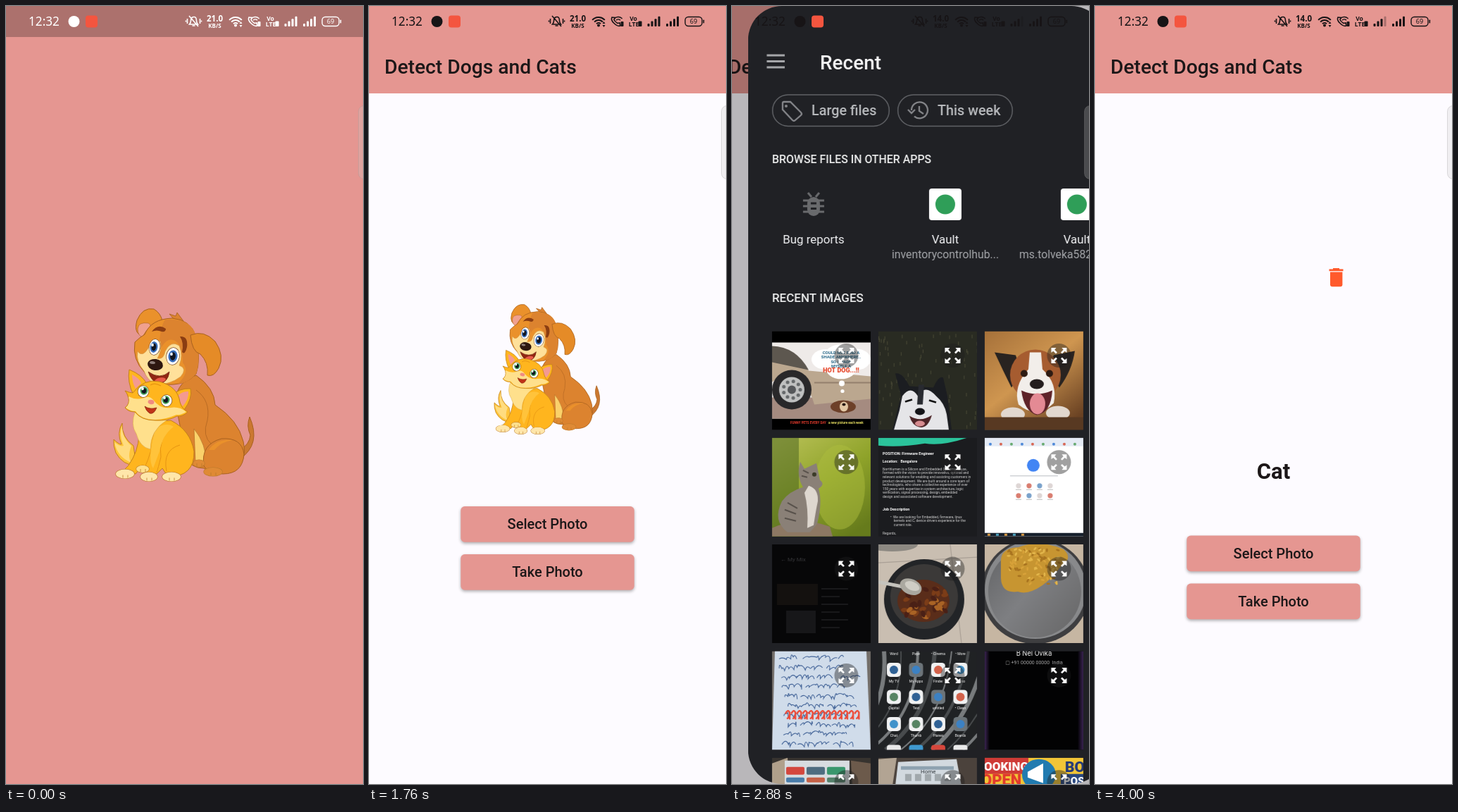
Recreate the animation shown at these times as an HTML page with a canvas. Size 507 px wide and 1104 px high, loop 4.08 s.

```html
<!DOCTYPE html>
<html lang="en">
<head>
<meta charset="utf-8">
<title>Pet detector</title>
<style>
html, body { margin: 0; width: 100%; height: 100%; overflow: hidden; background: #e59691; }
canvas { display: block; }
</style>
</head>
<body>
<canvas id="stage" width="507" height="1104"></canvas>
<script>
const W = 507, H = 1104, LOOP = 4080, STEP = 80;
const PINK = '#e59691', PAPER = '#fdfbff', INK = '#1c1718', DARK = '#202125';
const ROBOTO = 'Roboto, sans-serif', NOTO = '"Noto Sans", sans-serif';
const stage = document.getElementById('stage').getContext('2d');
let g = stage;

const clamp = v => Math.max(0, Math.min(1, v));

function randomizer(seed) {
  return () => (seed = (seed * 16807) % 2147483647) / 2147483647;
}
function layer(draw) {
  const canvas = document.createElement('canvas');
  canvas.width = W;
  canvas.height = H;
  const previous = g;
  g = canvas.getContext('2d');
  draw();
  g = previous;
  return canvas;
}
function rect(x, y, w, h, fill, r = 0) {
  g.beginPath();
  g.roundRect(x, y, w, h, r);
  g.fillStyle = fill;
  g.fill();
}
function oval(x, y, rx, ry, fill, turn = 0) {
  g.beginPath();
  g.ellipse(x, y, rx, ry, turn, 0, 7);
  g.fillStyle = fill;
  g.fill();
}
function shape(d, fill, line, width = 1) {
  const path = new Path2D(d);
  if (fill) { g.fillStyle = fill; g.fill(path); }
  if (line) { g.strokeStyle = line; g.lineWidth = width; g.stroke(path); }
}
function text(s, x, y, size, fill, { weight = 400, align = 'left', font = ROBOTO } = {}) {
  g.font = `${weight} ${size}px ${font}`;
  g.textAlign = align;
  g.fillStyle = fill;
  g.fillText(s, x, y);
}
function gradient(x0, y0, x1, y1, ...colors) {
  const fill = g.createLinearGradient(x0, y0, x1, y1);
  colors.forEach((c, i) => fill.addColorStop(i / (colors.length - 1), c));
  return fill;
}

/* Dog and cat */

function eye(x, y, rx, ry, iris, dx, dy) {
  oval(x, y, rx + .7, ry + .7, '#7b4a20', .15);
  oval(x, y, rx, ry, '#fff', .15);
  oval(x + dx, y + dy, rx * .72, ry * .72, iris, .15);
  oval(x + dx, y + dy, rx * .43, ry * .48, '#10141f', .15);
  oval(x + dx - 2, y + dy - 3, 1.8, 2.2, '#fff');
}
function paw(x, y, rx, ry, fill) {
  oval(x, y, rx + .6, ry + .6, '#b9792b');
  oval(x, y, rx, ry, fill);
  shape(`M${x - 3} ${y + ry - 5}v4M${x + 4} ${y + ry - 5}v4`, null, '#b9792b', .8);
}
function dog() {
  const tan = '#dc832f', edge = '#a8611f', bright = '#ea912b', cream = '#ffe09a';
  shape('M332 643Q363 622 346 583Q341 596 347 609Q346 622 332 630Z', '#cb7830', edge);
  shape('M240 560Q244 532 270 524Q296 542 297 566Q330 588 337 618Q343 646 324 660Q300 668 281 656Q262 656 256 640Z', tan, edge);
  shape('M270 545Q291 560 286 588Q278 610 292 622', null, '#b96b24', 1);
  shape('M267 600Q285 622 284 650Q276 657 269 648Z', '#fad16a', edge, .6);
  shape('M281 653Q276 622 306 614Q335 612 338 636Q336 664 308 664Q289 664 281 653Z', tan, edge);
  shape('M288 630Q298 614 322 616Q306 618 296 630Z', bright);
  paw(294, 661, 13, 6, '#df8a35');
  paw(274, 649, 8, 5, '#df8a35');
  shape('M198 468Q180 468 186 446Q194 427 210 430Q220 436 222 447Q207 452 198 468Z', bright, edge);
  shape('M187 458Q188 448 202 450Q209 453 200 460Q196 465 194 470Q187 468 187 458Z', '#f0a08e', edge, .6);
  shape('M238 444L232 437L241 440L243 435L252 447Z', tan, edge, .8);
  shape('M197 466Q206 444 236 443Q262 445 270 469Q277 502 270 522Q258 536 238 537Q206 539 197 520Q179 502 183 477Q190 470 197 466Z', bright, edge);
  shape('M226 445Q264 442 270 469Q277 502 270 522Q258 536 244 536Q262 520 251 506Q250 478 238 474Q226 470 217 492Q218 456 226 445Z', tan);
  shape('M203 484Q208 470 219 476Q222 488 215 500Q224 502 226 490Q234 474 246 482Q252 496 246 510Q258 514 248 526Q232 538 212 537Q200 530 196 518Q184 504 187 490Q194 500 203 484Z', cream, '#cf9440', .6);
  shape('M262 467Q281 459 297 476Q311 496 302 514Q295 527 286 524Q288 506 276 494Q264 491 262 467Z', '#e58b27', edge);
  eye(211, 484, 7.5, 11, '#376dbb', -1, 0);
  eye(237, 497, 9, 12, '#376dbb', 0, 0);
  shape('M207 462Q216 450 227 458Q227 463 221 462Q214 459 207 462Z', '#8a3d12');
  shape('M247 469Q259 468 257 484Q254 496 250 491Q253 478 247 469Z', '#8a3d12');
  oval(212, 509, 11, 8, '#2e1710', .15);
  oval(208, 506, 4, 2, '#8d7c78', .15);
  shape('M202 519Q219 531 232 519Q230 535 216 536Q206 532 202 519Z', '#912612', '#6c220e', .8);
  oval(219, 531, 8, 3.5, '#e95b4a', -.2);
}
function cat() {
  const gold = '#ffb51e', edge = '#c28019', cream = '#ffe08c';
  shape('M165 592Q164 612 181 624L185 652Q166 652 156 634Q152 624 153 615Q160 622 164 622Q157 606 165 592Z', '#ffc43b', edge);
  shape('M165 595Q164 612 178 624Q172 640 178 648Q158 640 154 619Q162 626 167 624Q160 608 165 595Z', '#ffdc80');
  shape('M190 592Q190 624 180 642Q174 654 166 660L184 664L194 652L196 664L214 664L222 656L230 668Q268 668 267 632Q262 602 234 588Z', gold, edge);
  shape('M210 606Q208 632 196 657M234 598Q216 616 220 640Q216 656 214 662M247 623Q222 630 228 660', null, '#e69412', 1);
  shape('M212 600Q228 590 238 597Q222 609 218 632Q212 648 209 656Q200 644 212 600Z', '#ffc33b');
  paw(194, 657, 9, 5, cream);
  paw(169, 664, 13, 6.5, '#ffe6aa');
  paw(203, 668, 12, 6.5, '#ffe6aa');
  paw(235, 668, 13, 6.5, '#ffe6aa');
  shape('M184 574Q176 594 185 607Q190 626 205 629Q205 602 228 588L232 584Z', cream, '#d9a545', .6);
  shape('M175 516Q193 523 200 536L181 552Q172 534 175 516Z', gold, edge);
  shape('M179 523Q189 528 192 535L184 543Q179 534 179 523Z', '#f49a91');
  shape('M235 553Q246 542 262 543Q265 557 253 573L240 575Z', gold, edge);
  shape('M242 555Q250 546 259 547Q260 558 251 568Z', '#f49a91');
  shape('M180 549Q196 528 218 533Q244 540 247 562Q249 571 258 576Q251 583 243 582Q230 589 212 588Q192 588 183 576Q174 576 169 570Q176 565 174 556Q172 549 169 546Q176 549 180 549Z', gold, edge);
  shape('M174 554Q185 560 196 556Q204 552 210 560Q219 572 234 570Q246 568 256 576Q248 581 242 580Q226 587 212 587Q192 587 184 575Q176 575 170 570Q177 564 174 554Z', cream);
  eye(195, 547, 7.5, 8, '#42a15b', 1, -1);
  eye(228, 560, 7.5, 8, '#42a15b', -1, -1);
  oval(206, 562, 4.5, 3.2, '#f08b82', .2);
  shape('M197 568Q204 573 214 570Q210 580 204 578Q199 575 197 568Z', '#bf3318', '#82260f', .7);
  shape('M205 538Q211 534 220 539', null, '#e69412', 1.2);
}
function pets(x, y, scale) {
  g.save();
  g.translate(x, y);
  g.scale(scale, scale);
  g.translate(-153, -429);
  g.lineJoin = 'round';
  dog();
  cat();
  g.restore();
}

/* App pages */

function button(label, y) {
  g.save();
  g.shadowColor = 'rgba(0,0,0,.32)';
  g.shadowBlur = 4;
  g.shadowOffsetY = 2;
  rect(130.3, y, 246.4, 50.7, PINK, 5.6);
  g.restore();
  text(label, 253.5, y + 32, 20, INK, { weight: 500, align: 'center' });
}
function page(result) {
  rect(0, 0, W, H, PAPER);
  rect(0, 0, W, 124, PINK);
  text('Detect Dogs and Cats', 22, 95.5, 28.2, INK, { weight: 500 });
  const shift = result ? 41.5 : 0;
  if (result) {
    const red = '#ff5a2c';
    rect(338, 372, 9, 3, red);
    rect(332.5, 373.4, 20, 2.8, red);
    rect(334, 377.6, 17.4, 20.6, red, [0, 0, 3, 3]);
    text('Cat', 253.5, 671, 31, INK, { weight: 700, align: 'center' });
  } else {
    pets(178, 423, .752);
  }
  button('Select Photo', 710 + shift);
  button('Take Photo', 778 + shift);
}

/* Thumbnails, each in a 140 px square */

function lines(rows, x, y, gap, size, fill, options) {
  rows.forEach((row, i) => text(row, x, y + i * gap, size, fill, options));
}
function scribble(x, y, width, height, color, weight, random) {
  g.beginPath();
  g.moveTo(x, y);
  for (let dx = 0; dx < width; dx += height * .8) {
    if (random() < .2) g.moveTo(x + dx, y);
    else g.quadraticCurveTo(x + dx, y - height * (random() + .4), x + dx + height * (random() - .2), y + height * (random() - .5));
  }
  g.strokeStyle = color;
  g.lineWidth = weight;
  g.stroke();
}

const photos = [
  function car() {
    rect(0, 0, 140, 140, '#000');
    rect(0, 16, 140, 108, '#eeeae8');
    rect(0, 94, 140, 30, '#a58b80');
    shape('M0 38Q36 36 52 56L140 64V96L60 104Q48 60 10 66L0 72Z', '#bba78f');
    shape('M0 21Q34 22 52 55L0 44Z', '#5d574f');
    rect(60, 72, 80, 2, '#94806d');
    oval(28, 83, 28, 28, '#29282a');
    oval(28, 83, 18, 18, '#bfc0c0');
    oval(28, 83, 6, 6, '#55575a');
    for (let i = 0; i < 9; i++) oval(28 + 12 * Math.cos(i * .7), 83 + 12 * Math.sin(i * .7), 2.5, 2.5, '#66696b');
    [[76, 40, 20], [98, 36, 24], [119, 40, 21], [98, 52, 22]].forEach(([x, y, r]) => oval(x, y, r, r * .72, '#fff'));
    lines(['COULD NOT FIND A', 'SHADE ANYWHERE..', 'SO I MADE', 'MYSELF A'], 98, 32, 6.5, 6, '#236587', { weight: 700, align: 'center' });
    text('HOT DOG...!!', 98, 58, 9, '#e64124', { weight: 900, align: 'center' });
    oval(99, 74, 4, 4, '#fff');
    oval(100, 85, 2.6, 2.6, '#fff');
    oval(101, 107, 18, 9, '#6d4029');
    oval(102, 107, 6, 7, '#e3c8a5');
    oval(102, 104, 2.5, 2, '#24140e');
    text('FUNNY PETS EVERY DAY', 26, 131, 4.5, '#e63c2d', { weight: 700 });
    text('a new picture each week', 80, 131, 4.5, '#eee564', { weight: 700 });
  },
  function husky() {
    rect(0, 0, 140, 140, '#292b22');
    const random = randomizer(8);
    for (let i = 0; i < 90; i++) rect(random() * 140, random() * 140, 1.2, 5, '#464634');
    shape('M24 60L32 92L20 140H104L98 92L92 66Q86 62 78 80L44 78Q34 58 24 60Z', '#1b1d21');
    shape('M34 92Q46 76 56 92Q66 74 82 92Q94 102 97 118L100 140H22L30 112Z', '#e5e5e8');
    shape('M57 76L65 76L63 104L55 104Z', '#282a30');
    shape('M38 100l10-3M72 98l10 3', null, '#111', 2.4);
    oval(59, 114, 7, 5, '#141418');
    shape('M44 120Q60 130 76 119Q70 139 58 136Q48 134 44 120Z', '#4c2427');
    oval(59, 131, 7, 4, '#d78c90');
  },
  function collie() {
    rect(0, 0, 140, 140, gradient(0, 0, 110, 140, '#a6713a', '#cf9650', '#6a4223'));
    shape('M14 30L44 34L52 58L38 80Q26 56 14 30ZM128 28L98 34L90 54L106 80Q124 56 128 28Z', '#292320');
    oval(72, 62, 36, 36, '#a65c30');
    shape('M64 30H80L82 54Q104 74 98 102Q74 126 48 104Q40 78 62 54Z', '#f2eeea');
    oval(56, 60, 5, 5, '#2e1b13');
    oval(92, 60, 5, 5, '#2e1b13');
    oval(74, 75, 10, 7, '#241d1d');
    shape('M52 84Q74 94 96 84Q94 116 74 119Q56 114 52 84Z', '#5e2329');
    oval(75, 103, 11, 15, '#e48a94');
    oval(40, 118, 17, 10, '#e2d8cf');
    oval(104, 116, 17, 10, '#e2d8cf');
    rect(0, 122, 140, 18, '#583922');
  },
  function kitten() {
    rect(0, 0, 140, 140, gradient(20, 0, 110, 140, '#b6bf54', '#8fa32a', '#667b1c'));
    rect(0, 0, 38, 140, 'rgba(70,96,30,.5)');
    oval(96, 70, 36, 60, 'rgba(173,190,62,.5)');
    shape('M0 128Q40 110 82 126L86 140H0Z', '#8d7863');
    shape('M40 34L46 44L63 36L68 60Q76 66 66 72Q72 92 64 122L54 134H22Q0 118 14 90Q24 76 44 70Q34 54 40 34Z', '#8a8077');
    shape('M52 68Q66 72 65 90Q62 104 59 124L50 128Q52 100 46 78Z', '#ded7cf');
    oval(60, 52, 3, 3, '#3b3b28');
    shape('M22 92l14 8M18 102l16 6M18 114l16 4M44 46l8 4M42 54l8 2', null, '#58514b', 2);
  },
  function vacancy() {
    rect(0, 0, 140, 140, '#1b1c1f');
    shape('M0 0H126Q90 12 66 8Q30 14 0 11Z', '#2bc39b');
    const bold = { weight: 700 };
    text('POSITION: Firmware Engineer', 6, 24, 5.4, '#fff', bold);
    text('Location:   Bangalore', 6, 35, 5.2, '#fff', bold);
    lines(['Northlumen is a Silicon and Embedded Systems house,', 'formed with the vision to provide innovative, optimal and', 'relevant solutions for enabling and assisting customers in', 'product development. We are built around a core team of', 'technologists, who share a collective experience of over',
      '150 years with expertise in system architecture, logic', 'verification, signal processing, design, embedded', 'design and associated software development.'], 6, 46, 5.6, 4.9, '#d7d7d7');
    text('Job Description', 6, 103, 5.4, '#fff', bold);
    lines(['•  We are looking for Embedded, firmware, linux', '    kernels and C, device drivers experience for the', '    current role.'], 17, 114, 5.6, 4.9, '#d7d7d7');
    text('Regards,', 6, 137, 4.9, '#d7d7d7');
  },
  function browser() {
    rect(0, 0, 140, 140, '#fff');
    rect(0, 0, 140, 12, '#e5ebf5');
    for (let i = 0; i < 9; i++) oval(8 + i * 15, 9, 2, 2, ['#4d88d8', '#d86654', '#66aa70'][i % 3]);
    oval(69, 39, 9, 9, '#4285f4');
    shape('M36 54H104', null, '#b9bdc2', 1);
    for (let i = 0; i < 8; i++) {
      const x = 48 + i % 4 * 15, y = 68 + (i >> 2) * 14;
      oval(x, y, 3.6, 3.6, ['#ded6d5', '#d97d70', '#7aa2cb'][i % 3]);
      rect(x - 4, y + 5, 8, 1, '#bbb');
    }
    rect(0, 135, 140, 5, '#17202c');
    for (let i = 0; i < 5; i++) rect(4 + i * 12, 136, 4, 3, ['#da9b45', '#4da5c1'][i % 2]);
  },
  function playlist() {
    rect(0, 0, 140, 140, '#070708');
    text('← My Mix', 12, 24, 8, '#38383b');
    rect(7, 56, 58, 30, '#14110f');
    rect(20, 94, 42, 32, '#171719');
    for (let i = 0; i < 6; i++) rect(70, 62 + i * 11, 38 - i % 2 * 12, 2, '#19191b');
  },
  function curry() {
    rect(0, 0, 140, 140, '#c9beb1');
    shape('M0 26L140 18M102 0L118 140', null, '#aaa096', 1.2);
    oval(20, 0, 36, 10, '#8d8982');
    oval(65, 78, 57, 57, '#222427');
    oval(65, 74, 48, 46, '#3b3938');
    oval(64, 80, 37, 30, '#5a2d1a');
    const random = randomizer(21);
    for (let i = 0; i < 40; i++) oval(66 + (random() - .5) * 58, 82 + (random() - .5) * 42, 5, 3, ['#7c3d18', '#a96325', '#4a2016'][i % 3], i);
    shape('M0 53L40 61', null, '#c5c3bd', 5);
    oval(46, 60, 16, 11, '#aaa8a0', .4);
    oval(48, 59, 11, 6, '#cfcdc5', .4);
  },
  function rice() {
    rect(0, 0, 140, 140, '#c6b6a2');
    oval(72, 66, 77, 75, '#3e3e40');
    oval(72, 64, 72, 70, '#88898b');
    oval(71, 67, 66, 65, gradient(0, 20, 120, 120, '#656668', '#7e7f82', '#6b6b6c'));
    shape('M23 25Q22 5 48 4Q78 -8 112 7Q126 20 109 30Q94 50 82 58Q62 72 47 67Q24 70 23 48Z', '#c79531');
    const random = randomizer(33);
    for (let i = 0; i < 100; i++) oval(34 + random() * 72, 6 + random() * (random() < .5 ? 50 : 30), 2.8, 1.4, ['#e3b64c', '#a8731f', '#d8a23a'][i % 3], i);
  },
  function letter() {
    rect(0, 0, 140, 140, '#736e69');
    shape('M4 0H134L140 140H0Z', '#d0dcea');
    const random = randomizer(77);
    for (let i = 0; i < 10; i++) scribble(10 + random() * 14, 11 + i * 13.5, 92 + random() * 22, 7, '#446599', 1.1, random);
    for (let i = 0; i < 13; i++) {
      const x = 19 + i * 8.2;
      shape(`M${x} 89q4-8 6-1q0 6-4 8M${x + 6} 86v11`, null, '#ee4936', 2.3);
    }
  },
  function launcher() {
    rect(0, 0, 140, 140, '#202224');
    for (let i = 0; i < 12; i++) shape(`M${i * 22 - 100} 140Q${i * 20 - 25} 90 ${i * 24 - 40} 0`, null, i % 2 ? '#484b4d' : '#787b7d', 2 + i % 3 * 2);
    const names = ['Word', 'Paye', '• Cinema', '• More', 'My TV', 'My Apps', 'Finder', 'Photo', 'Capital', 'Text', 'untitled', '• Clean', 'Chat', 'Thumb', 'Planes', 'Boards'];
    for (let i = 0; i < 16; i++) {
      const x = 22 + i % 4 * 31.5, y = (i >> 2) * 38.5 - 12;
      if (i > 3) {
        rect(x - 10, y - 10, 20, 20, i % 5 ? '#f0f1f2' : '#6c7479', 5);
        oval(x, y, 6, 6, ['#3c81c3', '#d3624b', '#4092ca', '#568463', '#2f6195'][i % 5]);
      }
      text(names[i], x, y + 18, 5, '#fff', { align: 'center' });
    }
    for (let i = 0; i < 4; i++) rect(12 + i * 31.5, 133, 20, 10, ['#e9e9e9', '#3f99d0', '#d6473c', '#eaeaea'][i], 4);
  },
  function call() {
    rect(0, 0, 140, 140, '#020203');
    rect(0, 0, 7, 140, gradient(0, 0, 7, 0, '#3a2452', '#020203'));
    rect(132, 0, 8, 140, gradient(132, 0, 140, 0, '#020203', '#3a2452'));
    text('B Nel Ovika', 70, 7, 10, '#eee', { align: 'center' });
    text('▢ +91 00000 00000  India', 70, 19, 7, '#aaa', { align: 'center' });
  },
  function signs() {
    rect(0, 0, 140, 140, '#37332f');
    shape('M0 8L22 0L24 40H0Z', '#b0a08b');
    rect(18, 4, 92, 40, '#d7dce0');
    for (let i = 0; i < 3; i++) rect(20 + i * 29, 13, 26, 11, ['#d3473e', '#4f6d80', '#39976d'][i], 2);
    for (let i = 0; i < 3; i++) rect(20 + i * 29, 28, 26, 7, ['#497ca9', '#c56147', '#55816b'][i], 2);
    shape('M112 4L140 8V40H114Z', '#6c5a4b');
  },
  function monitor() {
    rect(0, 0, 140, 140, '#4b423c');
    shape('M0 2L26 0L20 40H0Z', '#b2a493');
    shape('M28 6L111 2L118 40H24Z', '#d2d9df');
    rect(32, 12, 75, 5, '#8ea2b0');
    for (let i = 0; i < 5; i++) rect(38 + i * 14, 23, 9, 10, '#a1a8ac');
    text('Home', 60, 22, 8, '#30363b');
  },
  function poster() {
    rect(0, 0, 140, 140, '#f2c537');
    rect(0, 0, 62, 23, '#cf3a36');
    text('BOOKING', -12, 18, 17, '#fff', { weight: 900 });
    text('OPEN', -5, 39, 22, '#e2392d', { weight: 900 });
    oval(77, 24, 24, 22, '#217bb0');
    shape('M61 20L83 8V36L61 28Z', '#fff');
    text('BOY', 114, 20, 21, '#243a78', { weight: 900 });
    rect(108, 23, 32, 17, '#29477f');
    text('POST', 112, 38, 15, '#fff', { weight: 900 });
  }
];

function expandIcon(x, y) {
  oval(x, y, 17, 17, 'rgba(30,30,30,.42)');
  for (let i = 0; i < 4; i++) {
    g.save();
    g.translate(x, y);
    g.rotate(i * Math.PI / 2);
    shape('M-11 -11H-4L-6.2 -8.2L-2.6 -4.4L-4.4 -2.6L-8.2 -6.2L-11 -4Z', '#fff');
    g.restore();
  }
}

/* File picker */

function clockIcon(x, y) {
  shape(`M${x - 10} ${y}a11.5 11.5 0 1 1 4 8.6M${x - 15} ${y - 1}l5 5 5-5M${x + 1} ${y - 6}v7l6 4`, null, '#85868a', 2.3);
}
function bugIcon(x, y) {
  const gray = '#696a6d';
  rect(x - 9, y - 10, 18, 27, gray, 9);
  shape(`M${x - 15} ${y - 5}h30M${x - 15} ${y + 3}h30M${x - 15} ${y + 11}h30M${x - 8} ${y - 16}l5 6M${x + 8} ${y - 16}l-5 6`, null, gray, 3);
  rect(x - 4, y - 2.5, 8, 3, DARK);
  rect(x - 4, y + 5, 8, 3, DARK);
}
function appTile(name, x) {
  rect(x - 23, 259, 46, 45, '#fff', 4);
  oval(x, 281.5, 14, 14, '#2f9e58');
  text(name, x, 336.5, 16.9, '#f1f2f4', { align: 'center' });
}
function files() {
  rect(0, 0, W, H, DARK);
  [70, 78.5, 87].forEach(y => rect(26.5, y - 1.5, 25.5, 3, '#a5a6a9'));
  text('Recent', 102, 89.5, 28, '#f5f5f6', { weight: 500 });
  [[34, 167, 'Large files', 90], [212, 164, 'This week', 269]].forEach(([x, w, label, tx]) => {
    g.beginPath();
    g.roundRect(x + .7, 126, w - 1.4, 44.4, 22);
    g.strokeStyle = '#606266';
    g.lineWidth = 1.5;
    g.stroke();
    text(label, tx, 154.5, 19.8, '#b8babd', { weight: 500 });
  });
  shape('M50 136h10l15 15q2 2 0 4l-8 7q-2 2-4 0l-14-15v-9q0-2 2-2Z', null, '#85868a', 2.3);
  oval(54, 142, 2, 2, '#85868a');
  clockIcon(242, 148);
  text('BROWSE FILES IN OTHER APPS', 34, 222.5, 15.9, '#eceded', { weight: 500 });
  text('RECENT IMAGES', 34, 420, 17, '#eceded', { weight: 500 });
  bugIcon(93, 281);
  text('Bug reports', 93, 336.5, 16.9, '#f1f2f4', { align: 'center' });
  appTile('Vault', 280);
  appTile('Vault', 467);
  text('inventorycontrolhub...', 280, 358, 15.8, '#a5a7ab', { align: 'center' });
  text('ms.tolveka582@postal...', 385, 358, 15.8, '#a5a7ab');
  photos.forEach((photo, i) => {
    g.save();
    g.translate(34 + i % 3 * 151, 461.5 + Math.floor(i / 3) * 151.3);
    g.beginPath();
    g.rect(0, 0, 140, 140);
    g.clip();
    photo();
    expandIcon(105.5, 34.5);
    g.restore();
  });
}
function pickerActions() {
  const gray = '#aeafb2';
  g.beginPath();
  g.arc(403.5, 74.5, 7.5, 0, 7);
  g.moveTo(409, 80);
  g.lineTo(418, 89);
  g.strokeStyle = gray;
  g.lineWidth = 3;
  g.stroke();
  [70, 78.5, 87].forEach(y => oval(472.5, y, 2.8, 2.8, '#f2f2f3'));
  rect(429, 403, 24, 20, gray, 1);
  shape('M430.5 410h21M430.5 416.2h21M435.5 404.5v17', null, DARK, 1.6);
  shape('M430.5 404.3h21', null, gray, 1);
}

/* System overlay */

function signal(x, color, weak) {
  for (let i = 0; i < 4; i++) {
    g.globalAlpha = weak && i === 3 ? .3 : 1;
    rect(x + i * 5, 25 - i * 3.4, 3, 4 + i * 3.4, color, 1);
  }
  g.globalAlpha = 1;
}
function arcs(x, y, radii, color, width) {
  radii.forEach(r => {
    g.beginPath();
    g.arc(x, y, r, -2.4, -.74);
    g.strokeStyle = color;
    g.lineWidth = width;
    g.stroke();
  });
}
function statusBar(t, color) {
  const center = { weight: 700, align: 'center', font: NOTO };
  text('12:32', 32, 28, 17.2, color, { font: NOTO });
  oval(96.5, 22, 8, 8, color);
  rect(113, 13.5, 17, 17, '#f4553f', 4);
  shape('M260.5 26q2-2 2-5q0-5 4-5.500t4 5.500q0 3 2 5ZM264.500 28h4M260 14l13 15M257.500 18v7M275.500 18v7M255.500 20.500v2M277.500 20.500v2', null, color, 1.6);
  text(t < 2000 ? '21.0' : '14.0', 296.5, 21.5, 11.5, color, center);
  text('KB/S', 296.5, 30.500, 8, color, center);
  arcs(326, 28, [4, 8, 12], color, 2.1);
  oval(326, 27.5, 2, 2, color);
  shape('M331.500 25l2-3 2 3ZM331.500 27l2 3 2-3Z', color);
  shape('M345 16q-2 4 3 8.500q5 5 9 3.500l-1-4-3 .5q-4-2.500-5-5l1-3Z', null, color, 1.6);
  arcs(354, 23, [4, 7.5], color, 1.5);
  rect(357.5, 22, 4, 7, color, 1);
  text('Vo', 375.500, 20.5, 8.5, color, center);
  text('LTE', 376, 29, 8.5, color, center);
  rect(382.5, 21.500, 5, 7.500, color, 1);
  signal(395.500, color, t >= 2240);
  signal(422, color, false);
  g.beginPath();
  g.roundRect(449, 15.500, 24, 13, 4.5);
  g.strokeStyle = color;
  g.lineWidth = 1.4;
  g.stroke();
  rect(474.500, 19.500, 1.6, 5, color, 1);
  text('69', 461, 25.300, 9, color, { align: 'center', font: NOTO });
}
function edgeHandle() {
  g.beginPath();
  g.roundRect(500.5, 141.5, 20, 104, 8);
  g.fillStyle = 'rgba(200,200,200,.25)';
  g.fill();
  g.strokeStyle = 'rgba(150,150,150,.3)';
  g.lineWidth = 1;
  g.stroke();
}

const splashLayer = layer(() => {
  rect(0, 0, W, H, PINK);
  pets(153, 429, 1);
});
const homeLayer = layer(() => page(false));
const resultLayer = layer(() => page(true));
const filesLayer = layer(files);
const actionsLayer = layer(pickerActions);

function panelX(t) {
  if (t < 2720) return W;
  if (t < 3200) return 117 * Math.exp(-(t - 2720) / 98);
  if (t < 3280) return 0;
  const p = clamp((t - 3280) / 480), n = 2.27;
  return W * (p < .5 ? (2 * p) ** n / 2 : 1 - (2 - 2 * p) ** n / 2);
}
function drawOpening(t) {
  const p = t < 560 ? 0 : clamp((t - 520) / 320);
  const grow = 1 - (1 - p) ** 3;
  g.drawImage(splashLayer, 0, 0);
  rect(0, 0, W, 44, `rgba(0,0,0,${.25 * (1 - p)})`);
  if (!p) return;
  g.save();
  g.globalAlpha = clamp(p * 1.6);
  g.translate(W / 2, H / 2);
  g.scale(.85 + .15 * grow, .85 + .15 * grow);
  g.drawImage(homeLayer, -W / 2, -H / 2);
  g.restore();
}
function drawPicker(t, x) {
  const cover = clamp(1 - x / 130);
  rect(0, 0, W, H, PAPER);
  g.drawImage(homeLayer, -33 * cover, 0);
  rect(0, 0, W, H, `rgba(0,0,0,${.33 * cover})`);
  g.save();
  g.beginPath();
  g.roundRect(x, 0, W, H, 48 * clamp(x / 10));
  g.clip();
  g.globalAlpha = clamp(1 - (x - 30) / 460);
  g.drawImage(filesLayer, x, 0);
  g.globalAlpha *= clamp((t - 2880) / 160);
  g.drawImage(actionsLayer, x, 0);
  g.restore();
}
function render(t) {
  const x = panelX(t);
  if (t < 960) drawOpening(t);
  else if (t >= 3920) g.drawImage(resultLayer, 0, 0);
  else if (x < W) drawPicker(t, x);
  else g.drawImage(homeLayer, 0, 0);
  edgeHandle();
  const light = t < 640 || (t >= 2960 && t < 3520);
  statusBar(t, light ? '#fff' : '#171416');
  if (t >= 3280 && t < 3440) oval(70, 691, 15, 15, 'rgba(225,225,225,.5)');
}
function tick(now) {
  render(Math.floor(now % LOOP / STEP) * STEP);
  requestAnimationFrame(tick);
}
render(0);
requestAnimationFrame(tick);
</script>
</body>
</html>
```
